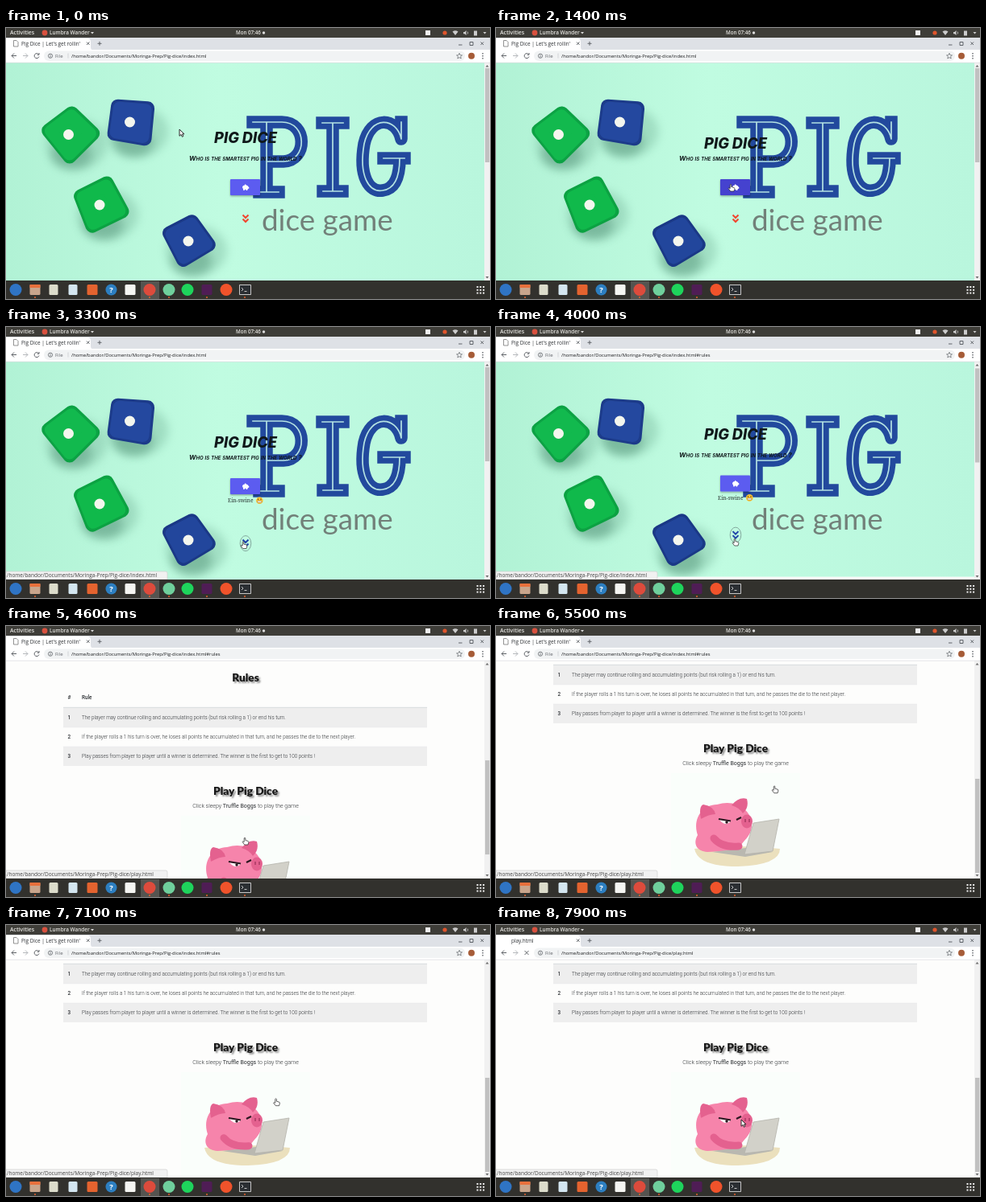
These frames come from a looping animation (600x337 px, 8000 ms). An HTML page:

```html
<!DOCTYPE html>
<html lang="en">
<head>
<meta charset="utf-8">
<title>Pig Dice</title>
<style>
html, body { margin: 0; width: 100%; height: 100%; overflow: hidden; background: #2f2e2b; }
svg { display: block; width: 100vw; height: 100vh; }
text { font-family: "Open Sans", sans-serif; white-space: pre; }
.mid { text-anchor: middle; }
.bar text { fill: #e6e5e1; font-weight: 600; }
.line { fill: none; stroke: #5f6368; stroke-width: 1; }
.marker { font-family: Inter, sans-serif; font-style: italic; font-weight: 800; fill: #10181a; }
.head { font: 900 13.7px Lato, sans-serif; fill: #161616; text-shadow: 2px 2px 2px rgba(0,0,0,.45); }
.rule { font: 300 6.32px Roboto, sans-serif; fill: #2c2f33; }
.rule.bold { font-weight: 500; }
.lead { font: 300 7px Roboto, sans-serif; fill: #2c2f33; }
.lead tspan { font-weight: 400; }
.pink { fill: #f684ab; }
.rose { fill: #e4618f; }
</style>
</head>
<body>
<svg viewBox="0 0 600 337">
  <defs>
    <linearGradient id="mint">
      <stop offset="0" stop-color="#b1f2d5"/>
      <stop offset=".45" stop-color="#c0fce1"/>
      <stop offset="1" stop-color="#b9f6dd"/>
    </linearGradient>
    <filter id="soft" x="-50%" y="-50%" width="200%" height="200%"><feGaussianBlur stdDeviation="6"/></filter>
    <filter id="lift" x="-20%" y="-20%" width="140%" height="160%"><feDropShadow dx="0" dy="1.2" stdDeviation="1.2" flood-opacity=".35"/></filter>
    <clipPath id="view"><rect y="43" width="593" height="271"/></clipPath>
    <path id="letters" d="M306 117H342C374 117 374 165 344 166H323M323 117V203M314 204H338
      M392 118H418M405 118V203M393 203H417
      M490 117V138C484 111 452 108 444 144C437 184 450 205 467 202C482 200 488 185 488 162M468 162H494"/>
  </defs>

  <g clip-path="url(#view)">
    <rect y="43" width="593" height="271" fill="url(#mint)"/>
    <g id="dice"></g>
    <g fill="none" stroke-linejoin="round" stroke-linecap="square">
      <use href="#letters" stroke="#22499d" stroke-width="15.5"/>
      <use href="#letters" stroke="#b4e2e2" stroke-width="1.7"/>
    </g>
    <text x="317" y="251.500" font-size="36.8" fill="#728079" style="font-family:Lato,sans-serif">dice game</text>

    <g id="hero">
      <text id="title" class="marker mid" x="297" y="150" font-size="18.2">PIG DICE</text>
      <text class="marker mid" x="297" y="165" font-size="8.2" style="font-variant:small-caps;font-weight:700">Who is the smartest pig in the world ?</text>
      <rect id="button" x="278" y="188" width="37" height="20" rx="1" filter="url(#lift)"/>
      <path d="M293 197.500Q294 195.300 296 195.500L296.500 194L298 195.500Q300 196 300.500 197.500L301.300 198V199.500L300 200L299 202H297.700L297.400 200.800H296L295.600 202H294.300L294 200Q293 199 293 197.500Z" fill="#fff"/>
      <g id="answer">
        <text x="275" y="218.300" font-size="6.7" fill="#26302f" style="font-family:'Noto Serif',serif">Ein-swine</text>
        <circle cx="314.300" cy="215.800" r="4.300" fill="#fbc233"/>
        <path d="M312.500 213.500V215M316 213.500V215" stroke="#5b4020"/>
        <rect x="311.600" y="216.300" width="5.400" height="2" rx="1" fill="#fff" stroke="#5b4020" stroke-width=".4"/>
      </g>
      <g id="chevron">
        <ellipse id="ring" rx="6.800" ry="9.500" fill="none" stroke="#74938c" stroke-width=".8"/>
        <path d="M-3.500 -4.500L0 -1L3.500 -4.500M-3.500 .5L0 4L3.500 .5" fill="none" stroke-width="2"/>
      </g>
    </g>

    <g id="rules">
      <rect y="43" width="593" height="330" fill="#fdfdfc"/>
      <text class="head mid" x="297" y="69">Rules</text>
      <rect x="71" y="101" width="451" height="25" fill="#eee"/>
      <rect x="71" y="150" width="451" height="24" fill="#eee"/>
      <path d="M71 101.300H522" stroke="#d9dcdf"/>
      <path d="M71 126H522M71 150H522" stroke="#e4e6e8" stroke-width=".5"/>
      <text class="rule bold" x="76.500" y="91.300">#</text>
      <text class="rule bold" x="94" y="91.300">Rule</text>
      <g id="rows"></g>
      <text class="head mid" x="297" y="210">Play Pig Dice</text>
      <text class="lead mid" x="297" y="225.500">Click sleepy <tspan>Truffle Boggs</tspan> to play the game</text>
      <rect x="217" y="236" width="160" height="140" fill="#fafefb"/>
      <g transform="translate(0 53)">
        <g id="typing">
          <path d="M246 277Q300 271 352 277Q352 297 300 299Q250 299 246 277Z" fill="#ebe0bd"/>
          <path class="pink" d="M250 260C243 240 256 222 274 222C298 214 318 230 317 248C317 260 308 266 304 272L300 279L262 281C248 280 244 270 250 260Z"/>
          <path class="rose" d="M254 240Q251 224 257 222Q270 224 272 234Q264 234 254 240ZM292 223Q301 212 311 215Q314 226 306 233Q302 226 292 223Z"/>
          <ellipse class="rose" cx="311" cy="243" rx="7" ry="8.500"/>
          <path d="M309 240V244M314 240V244" stroke="#a93a64" stroke-width="1.500"/>
          <path d="M277 241Q284 250 291 243Z" fill="#fff"/>
          <path d="M276 240L291 242.500M298 241L304 238" stroke="#2b1820" stroke-width="2.200"/>
          <circle cx="286" cy="244" r="1.700" fill="#2b1820"/>
          <path d="M268 281L309 287L343 281L310 276Z" fill="#b9b8b0"/>
          <path id="arm" d="M270 264Q280 276 301 274" fill="none" stroke="#e4618f" stroke-width="9" stroke-linecap="round"/>
          <path d="M319 245L351 240L343 280L308 284Z" fill="#d2d1c9" stroke="#b4b3ab" stroke-width=".8" stroke-linejoin="round"/>
        </g>
        <g id="laughing">
          <path d="M321 246Q329 243 326 237Q320 234 322 240" fill="none" stroke="#e4618f" stroke-width="2.500"/>
          <ellipse class="rose" cx="338" cy="276" rx="8" ry="7"/>
          <ellipse class="rose" cx="311" cy="284" rx="8" ry="5"/>
          <ellipse class="pink" cx="314" cy="260" rx="31" ry="21"/>
          <ellipse class="pink" cx="278" cy="261" rx="25" ry="26"/>
          <path class="rose" d="M257 245Q250 233 258 231Q268 232 272 241ZM284 236Q288 225 298 226Q304 236 300 247Q294 239 284 236Z"/>
          <ellipse class="rose" cx="262" cy="258" rx="8" ry="8"/>
          <path d="M260 255V260M265 255V260" stroke="#b54670" stroke-width="1.600"/>
          <path d="M265 272Q281 272 294 262Q295 281 280 284Q269 283 265 272Z" fill="#7d1f35"/>
          <path d="M274 281Q282 274 289 280Q281 286 274 281Z" fill="#e0566f"/>
          <path d="M275 251L284 253L277 256" fill="none" stroke="#6b2440" stroke-width="1.500"/>
        </g>
      </g>
    </g>
  </g>

  <rect x="593" y="43" width="7" height="271" fill="#f1f1f1"/>
  <path d="M594.500 48.500L596.500 46L598.500 48.500ZM594.500 309L596.500 311.500L598.500 309Z" fill="#6a6a6a"/>
  <rect id="thumb" x="594" width="5.300" height="117" fill="#c1c1c1"/>

  <g id="status">
    <path d="M0 304H198Q200 304 200 306V314H0Z" fill="#f1f1f1" stroke="#cfcfcf" stroke-width=".7"/>
    <text id="link" x="1" y="311.300" font-size="6.500" fill="#444"></text>
  </g>

  <g class="bar">
    <rect width="600" height="12" fill="#3e3d38"/>
    <text x="5" y="8.400" font-size="6.900">Activities</text>
    <circle cx="48" cy="6" r="3.400" fill="#d9513f"/>
    <text x="54" y="8.400" font-size="6.400">Lumbra Wander</text>
    <path d="M105 5H109L107 7.500Z" fill="#ddd"/>
    <text x="285" y="8.400" font-size="6.200">Mon 07:46</text>
    <circle cx="319.500" cy="6" r="1.700" fill="#ddd"/>
    <rect x="520" y="3" width="6" height="6" fill="#eee"/>
    <circle cx="544" cy="6" r="2.600" fill="#e0552c"/>
    <path d="M553.500 4.500Q557 2 560.500 4.500L557 9ZM567 5H568.500L570.500 3V9L568.500 7.200H567ZM580 3.500H584V9.500H580ZM591.500 5H595.500L593.500 7.500Z" fill="#ccc"/>
    <path d="M572 4.500Q573.500 6 572 7.700" fill="none" stroke="#ccc" stroke-width=".8"/>
  </g>

  <rect y="12" width="600" height="15.500" fill="#dee1e6"/>
  <path d="M0 13H101Q105 13 105 17V24Q105 27.500 109 27.500H0Z" fill="#fff"/>
  <path id="favicon" d="M9.500 15.500H13L15 17.500V23H9.500Z" fill="#fff" stroke="#777" stroke-width=".8"/>
  <text id="tab" x="19" y="21.500" font-size="6.400" fill="#2c2f33"></text>
  <path class="line" d="M100 17.500L103.500 21M103.500 17.500L100 21M113.500 19.300H118.500M116 16.800V21.800M561 21H565.500M575 17.500H579V21.500H575ZM588.500 17.500L592 21M592 17.500L588.500 21"/>
  <rect y="27" width="600" height="16" fill="#fff"/>
  <path d="M0 43.200H600" stroke="#dadce0" stroke-width=".7"/>
  <rect x="47" y="28.500" width="522" height="12.500" rx="6.200" fill="#f1f3f4"/>
  <path class="line" d="M13 34.500H7M10 31.500L7 34.500L10 37.500"/>
  <path class="line" d="M21 34.500H27M24 31.500L27 34.500L24 37.500" style="stroke:#b5b8bc"/>
  <path id="reload" class="line" d="M40.500 32.800A3 3 0 1 0 41 35.500M41 31V33.300H38.700"/>
  <path id="stop" class="line" d="M35.500 32L40.500 37M40.500 32L35.500 37"/>
  <circle class="line" cx="55" cy="34.700" r="2.600" style="stroke-width:.8"/>
  <path class="line" d="M55 34.300V36.300M55 33V33.600" style="stroke-width:.8"/>
  <text x="61" y="36.800" font-size="6" fill="#5f6368">File</text>
  <path d="M77 31.500V37.500" stroke="#c4c7ca" stroke-width=".7"/>
  <text id="url" x="81" y="36.800" font-size="5.850" font-weight="500" fill="#1c1e20"></text>
  <path class="line" d="M562 31.300L563 33.700L565.500 33.900L563.600 35.500L564.200 38L562 36.600L559.800 38L560.400 35.500L558.500 33.900L561 33.700Z" style="stroke-width:.7"/>
  <circle cx="577" cy="34.700" r="4" fill="#a65c38"/>
  <path d="M591 31V32.400M591 34V35.400M591 37V38.400" stroke="#5f6368" stroke-width="1.400"/>

  <g id="dock"><rect y="314" width="600" height="23" fill="#32312d"/></g>

  <g id="cursor">
    <path id="arrow" d="M0 0V8.300L2 6.500L3.400 9.300L4.800 8.600L3.500 5.900H6Z" fill="#f4f4f4" stroke="#1a1a1a" stroke-width=".9"/>
    <path id="hand" d="M-.8 .8Q0 -.5 .8 .8V3.500L4.200 4.500Q5 5 4.700 6.500L4 9H-.3L-3 5.500Q-2.700 4.300 -.8 5.500Z" fill="#fff" stroke="#222" stroke-width=".7"/>
  </g>
</svg>

<script>
const $ = id => document.getElementById(id);
const LOOP = 8000, STEP = 100;
const FOLDER = '/home/bandor/Documents/Moringa-Prep/Pig-dice/';
const add = (id, markup) => $(id).insertAdjacentHTML('beforeend', markup);

function die(corners, face, edge, x, y) {
  const block = (color, scale) => `<polygon points="${corners}" fill="${color}" stroke="${color}" stroke-width="19"
    stroke-linejoin="round" transform="translate(${x} ${y}) scale(${scale}) translate(${-x} ${-y})"/>`;
  const shadow = (dx, dy, rx, ry, opacity) => `<ellipse cx="${x + dx}" cy="${y + dy}" rx="${rx}" ry="${ry}"
    fill="#5f9f83" opacity="${opacity}" filter="url(#soft)"/>`;
  add('dice', shadow(10, 12, 38, 31, .3) + shadow(4, 25, 25, 18, .55) + block(edge, .9) + block(face, .8)
    + `<circle cx="${x}" cy="${y}" r="6.5" fill="#f4f6ee"/>`);
}
die('50,127 82,103 111,131 79,163', '#12b94e', '#0ca244', 77.5, 132.5);
die('137,95 178,98 174,140 132,133', '#24489f', '#1c3b8a', 153.5, 117);
die('90,208 126,190 147,229 106,249', '#10b94b', '#0ca242', 116, 220);
die('200,254 231,238 254,270 219,291', '#22469c', '#1a3886', 226, 265);

[
  'The player may continue rolling and accumulating points (but risk rolling a 1) or end his turn.',
  'If the player rolls a 1 his turn is over, he loses all points he accumulated in that turn, and he passes the die to the next player.',
  'Play passes from player to player until a winner is determined. The winner is the first to get to 100 points !'
].forEach((rule, i) => {
  const y = 115.8 + i * 24.2;
  add('rows', `<text class="rule bold" x="76.5" y="${y}">${i + 1}</text><text class="rule" x="94" y="${y}">${rule}</text>`);
});

const disc = (x, color, r = 7.5) => `<circle cx="${x}" cy="325.5" r="${r}" fill="${color}"/>`;
const tile = (x, color, w = 13) => `<rect x="${x - w / 2}" y="319" width="${w}" height="13" rx="1.5" fill="${color}"/>`;
add('dock', `<rect x="167" y="315" width="23" height="22" fill="#555450"/>`
  + disc(12, '#2f74c4') + tile(36, '#c9a58c') + '<path d="M29.500 319H42.500V323H29.500Z" fill="#e8703c"/>'
  + tile(59, '#dcdccb', 11) + tile(83, '#d4e6f0', 11) + tile(107, '#e4632f')
  + disc(130.5, '#2d7fc1', 7) + '<text class="mid" x="130.500" y="329" font-size="9.500" font-weight="700" fill="#fff">?</text>'
  + tile(154, '#f5f5f2') + disc(178, '#dd4b3c') + disc(202, '#6fcf9c') + disc(225, '#1ed45c')
  + tile(249, '#4f1d55') + disc(273, '#f0532b')
  + tile(296.5, '#2b2f33', 14) + '<path d="M289.500 319.500H303.500V331.500H289.500ZM292 323L294 325L292 327M295.500 327.500H298.500" fill="none" stroke="#d8d8d8" stroke-width=".9"/>'
  + [36, 178, 202, 249, 296].map(x => `<circle cx="${x}" cy="335" r="1" fill="#e8602c"/>`).join('')
  + Array.from({length: 9}, (_, i) => `<rect x="${583.5 + i % 3 * 3.8}" y="${321 + (i / 3 | 0) * 3.8}" width="2" height="2" fill="#eee"/>`).join(''));

// Smoothly interpolated value from rows of [time, value].
function track(rows, t) {
  const next = rows.findIndex(row => row[0] > t);
  if (next < 0) return rows[rows.length - 1][1];
  if (next === 0) return rows[0][1];
  const [t0, a] = rows[next - 1], [t1, b] = rows[next];
  return a + (b - a) * (1 - Math.cos(Math.PI * (t - t0) / (t1 - t0))) / 2;
}

const scrollRows = [[3960, 0], [4520, 271], [4640, 271], [4860, 324]];
const titleBounce = [[0, 0], [.2, 0], [.4, -13.2], [.43, -13.2], [.53, 0], [.7, -6.6], [.8, 0], [.9, -1.8], [1, 0]];
const arrowBounce = [[0, 0], [.2, 0], [.4, -20], [.5, 0], [.6, -10], [.8, 0], [1, 0]];
const pointerX = [[400, 215], [1200, 291], [1700, 291], [2300, 292], [3200, 292], [3400, 296], [5000, 296], [5800, 367], [6200, 378], [6450, 378], [6800, 354], [7500, 304]];
const pointerY = [[400, 126], [1200, 194], [1700, 194], [2300, 270], [3200, 270], [3400, 263], [5000, 263], [5800, 170], [6200, 173], [6450, 173], [6800, 199], [7500, 242]];

const between = (t, a, b) => t >= a && t < b;
const show = (id, on) => $(id).setAttribute('display', on ? 'inline' : 'none');
const move = (id, x, y) => $(id).setAttribute('transform', `translate(${x} ${y})`);
const write = (id, value) => { if ($(id).textContent !== value) $(id).textContent = value; };

function render(t) {
  const scroll = track(scrollRows, t);
  const answered = t >= 1600, hover = t >= 3300, leaving = t >= 7700;

  move('hero', 0, -scroll);
  move('rules', 0, 271 - scroll);
  $('thumb').setAttribute('y', 50 + scroll * 140 / 324);

  move('title', 0, track(titleBounce, (t / 1000 + .7) % 1));
  move('chevron', 297, (answered ? 272 : 247) + track(arrowBounce, (t / 2000 + .6) % 1));
  $('chevron').setAttribute('stroke', hover ? '#2143a8' : '#f0452f');
  show('ring', hover);
  show('answer', answered);
  $('button').setAttribute('fill', between(t, 1100, 1800) ? '#4542cf' : '#5c5cf0');

  const laughing = between(t, 5600, 7100);
  show('typing', !laughing);
  show('laughing', laughing);
  move('laughing', 0, Math.sin((t - 6400) / 200 * Math.PI / 2) * .8);
  move('arm', 0, Math.sin((t - 4600) / 300 * Math.PI) * .8);

  show('status', hover);
  write('link', FOLDER + (t >= 4500 ? 'play.html' : 'index.html'));
  write('url', FOLDER + (leaving ? 'play.html' : t >= 3900 ? 'index.html#rules' : 'index.html'));
  write('tab', leaving ? 'play.html' : "Pig Dice | Let's get rollin'");
  show('favicon', !leaving);
  show('reload', !leaving);
  show('stop', leaving);

  const hand = between(t, 1100, 1800) || between(t, 3300, 5600) || between(t, 6800, 7700);
  show('hand', hand);
  show('arrow', !hand);
  move('cursor', track(pointerX, t), track(pointerY, t));
}

const start = performance.now();
function tick(now) {
  const elapsed = Math.max(0, now - start) % LOOP;
  render(Math.floor(elapsed / STEP) * STEP);
  requestAnimationFrame(tick);
}
render(0);
requestAnimationFrame(tick);
</script>
</body>
</html>
```
